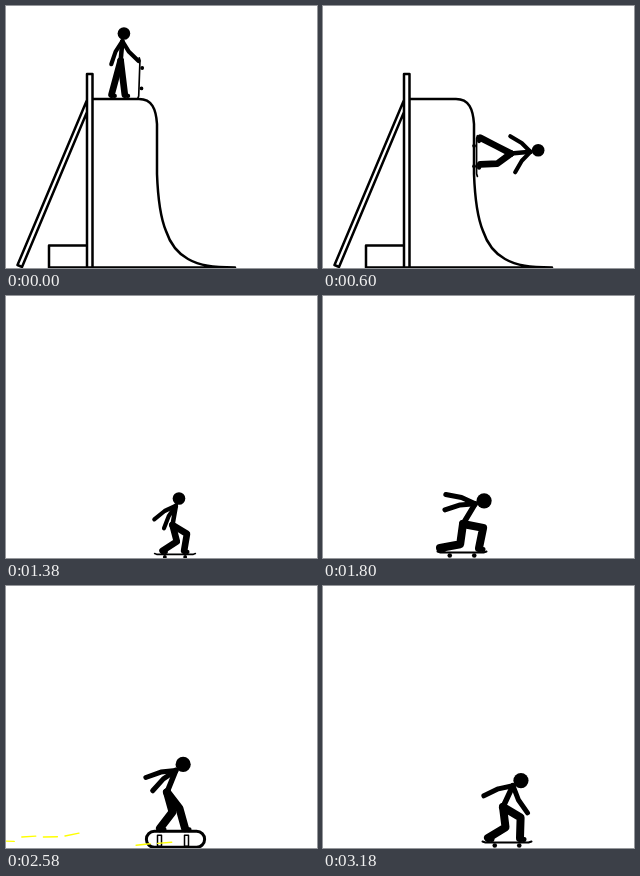
An HTML page with a canvas that plays this animation: 311x262 px, repeating every 3240 ms.

```html
<!DOCTYPE html>
<html lang="en">
<head>
<meta charset="utf-8">
<title>Skater</title>
<style>
  html, body { margin: 0; width: 311px; height: 262px; overflow: hidden; background: #fff; }
  canvas { display: block; }
</style>
</head>
<body>
<canvas id="stage" width="311" height="262"></canvas>
<script>
const ctx = document.getElementById('stage').getContext('2d');
const LOOP = 3240, STEP = 60, SCROLL = 0.9, CAMERA = 169;
const THIGH = 20.5, TORSO = 23.5, NECK = 9.5, ARM = 15;

const CURVE = 'M87 93H133C146 93 150 103 151 118V168C152 195 155 213 160 225C165 240 173 248 182 253C194 260 207 261 229 261.5';
const SCAFFOLD = 'M81 68h5.5v200h-5.5zM81 94L11.5 259L16 261L81 106M81 239.5H43V261.5H229';
const ramp = new Path2D(CURVE + SCAFFOLD);
const track = document.createElementNS('http://www.w3.org/2000/svg', 'path');
track.setAttribute('d', CURVE + 'H900');

const rad = deg => deg * Math.PI / 180;
const lerp = (a, b, u) => a + (b - a) * u;
const part = (t, from, to) => Math.min(1, Math.max(0, (t - from) / (to - from)));
const ease = (t, from, to) => { const u = part(t, from, to); return u * u * (3 - 2 * u); };
const arc = (t, from, to) => { const u = part(t, from, to); return 4 * u * (1 - u); };
const random = seed => { const v = Math.sin(seed * 12.9898) * 43758.5453; return v - Math.floor(v); };

// Hip position, angles in degrees, and where the feet stand along the board.
const pose = (hipX, hipY, lean, armA, armB, back, front) =>
  ({ hipX, hipY, lean, armA, armB, back, front });
const stand = pose(2, -45, 5, -33, 32, -9, 7);
const ride = pose(-3, -41, -5, -45, 46, -22, 10);
const roll = pose(-3, -35, 10, -65, -35, -15, 11);
const crouch = pose(1, -28, 31, -115, -86, -22, 17);
const grind = pose(-1, -45, 27, -98, 8, -5, 6);
const flip = pose(-7, -40, 22, -84, -56, -14, 11);
const land = pose(-4, -35, 25, -78, 21, -19, 13);
const push = { ...ride, back: -32 };

// time, pose, x on the stage
const beats = [
  [0, stand], [150, stand], [330, ride], [840, ride], [1080, roll], [1230, push], [1380, roll],
  [1530, push, 160], [1800, crouch, 139], [1980, land, 175], [2220, grind, 206],
  [2580, flip, 168], [3000, land, 184], [LOOP, land, 184]
];

function beatAt(t) {
  const n = beats.findIndex(beat => beat[0] > t);
  const [t0, a, x0 = CAMERA] = beats[n - 1], [t1, b, x1 = CAMERA] = beats[n];
  const u = ease(t, t0, t1);
  const body = {};
  for (const key in a) body[key] = lerp(a[key], b[key], u);
  return { body, x: lerp(x0, x1, u) };
}

function line(width, ...points) {
  ctx.lineWidth = width;
  ctx.beginPath();
  for (const [x, y] of points) ctx.lineTo(x, y);
  ctx.stroke();
}

function dot(x, y, r) {
  ctx.beginPath();
  ctx.arc(x, y, r, 0, 7);
  ctx.fill();
}

// The point at the given distance, with 0 degrees pointing down and 90 forward.
const reach = ([x, y], deg, length) =>
  [x + Math.sin(rad(deg)) * length, y + Math.cos(rad(deg)) * length];

function drawArm(shoulder, deg) {
  const elbow = reach(shoulder, deg, ARM);
  line(5, shoulder, elbow, reach(elbow, deg + 14, ARM + 1));
}

// The knee bends forward to keep thigh and shin the same length.
function drawLeg([hx, hy], footX) {
  const footY = -4, dx = footX - hx, dy = footY - hy, gap = Math.hypot(dx, dy);
  const bend = Math.sqrt(Math.max(0, THIGH ** 2 - gap ** 2 / 4)) / gap;
  const knee = [hx + dx / 2 + dy * bend, hy + dy / 2 - dx * bend];
  line(8, [hx, hy], knee, [footX, footY]);
  line(5, [footX, footY + 1], [footX + 4, footY + 1.5]);
}

function drawBody({ hipX, hipY, lean, armA, armB, back, front }) {
  const hip = [hipX, hipY];
  const neck = reach(hip, 180 - lean, TORSO);
  line(5.5, hip, neck);
  drawArm(neck, armA);
  drawArm(neck, armB);
  drawLeg(hip, back);
  drawLeg(hip, front);
  dot(...reach(neck, 180 - lean * 2.3, NECK), 7.6);
}

// Carried upright, laid down, slid under the feet; later it turns across the rail and flips.
function drawBoard(t) {
  const held = 1 - ease(t, 0, 240), ahead = 1 - ease(t, 240, 360);
  const turn = part(t, 2520, 2760) * 2;
  const tilt = Math.abs(Math.sin(turn * Math.PI));
  const half = 24.5 * (1 - 0.58 * arc(t, 2040, 2400) + 0.25 * tilt);
  ctx.save();
  ctx.translate(24 * ahead + 1.5 * tilt, 7 * tilt - 24 * held);
  ctx.rotate(-held * rad(88));
  if (tilt > 0.2) {
    const face = 16 * tilt;
    ctx.lineWidth = 3;
    ctx.beginPath();
    ctx.roundRect(1.5 - half, -face / 2, 2 * half - 3, face, face / 2);
    ctx.stroke();
    if (turn < 1) for (const x of [-18, 9]) {
      ctx.lineWidth = 1.5;
      ctx.strokeRect(x, -4, 4, 11);
    }
  } else {
    line(2, [-half, -0.5], [3 - half, 0.5], [half - 3, 0.5], [half, -0.5]);
    for (const side of [-1, 1]) dot(side * half / 2, 3.5, 2.3);
  }
  ctx.restore();
}

// Gathers speed along the ramp; the camera holds once the skater reaches mid-stage.
function onRamp(t) {
  const run = 26 + 1.86e-6 * Math.max(0, t - 240) ** 3;
  const d = Math.min(run, track.getTotalLength() - 2);
  const p = track.getPointAtLength(d), q = track.getPointAtLength(d + 1);
  const angle = Math.atan2(q.y - p.y, q.x - p.x);
  const lift = 1 + 2 * ease(t, 240, 360);
  const x = p.x + Math.sin(angle) * lift, y = p.y - Math.cos(angle) * lift;
  const shift = Math.max(0, x - CAMERA);
  return { x: x - shift, y, angle, shift };
}

function onGround(t, x, grow) {
  const rail = 14 * (ease(t, 2040, 2160) - ease(t, 2220, 2400));
  const jumps = 38 * arc(t, 1860, 2160) + 44 * arc(t, 2550, 3060);
  return { x, y: 258 - 2 * grow - rail - jumps, angle: -rad(20) * arc(t, 1860, 2040) };
}

function drawRamp(shift) {
  ctx.save();
  ctx.translate(-shift, 0);
  ctx.lineWidth = 2.5;
  ctx.stroke(ramp);
  ctx.restore();
}

function drawRail(t) {
  const left = -22 - (t - 2220) * SCROLL;
  line(2.5, [left, 244.5], [left + 248, 244.5]);
  for (let x = left + 20; x < left + 248; x += 104) line(2.5, [x, 244], [x, 264]);
}

function drawSparks(t, from, to, y) {
  for (let born = from; born < Math.min(t, to); born += 24) {
    const age = t - born, x = 203 - age * SCROLL;
    const fall = age * 0.05 + 5 * random(born) - 2;
    line(1.4, [x, y + fall], [x + 14, y + fall + 6 * random(born + 1) - 4]);
  }
}

function draw() {
  const t = Math.floor(performance.now() % LOOP / STEP) * STEP;
  const { body, x } = beatAt(t);
  const grow = ease(t, 1500, 1740), size = 0.83 + 0.17 * grow;
  const place = t < 1080 ? onRamp(t) : onGround(t, x, grow);

  ctx.fillStyle = '#fff';
  ctx.fillRect(0, 0, 311, 262);
  ctx.fillStyle = ctx.strokeStyle = '#000';
  ctx.lineCap = ctx.lineJoin = 'round';
  if (t < 1080) drawRamp(place.shift);
  else drawRail(t);

  ctx.save();
  ctx.translate(place.x, place.y);
  ctx.rotate(place.angle);
  ctx.scale(size, size);
  drawBoard(t);
  drawBody(body);
  ctx.restore();

  if (t <= 2700) {
    ctx.strokeStyle = '#ff0';
    drawSparks(t, 2204, 2440, 242);
    drawSparks(t, 2499, 2530, 255);
  }
  requestAnimationFrame(draw);
}
draw();
</script>
</body>
</html>
```
